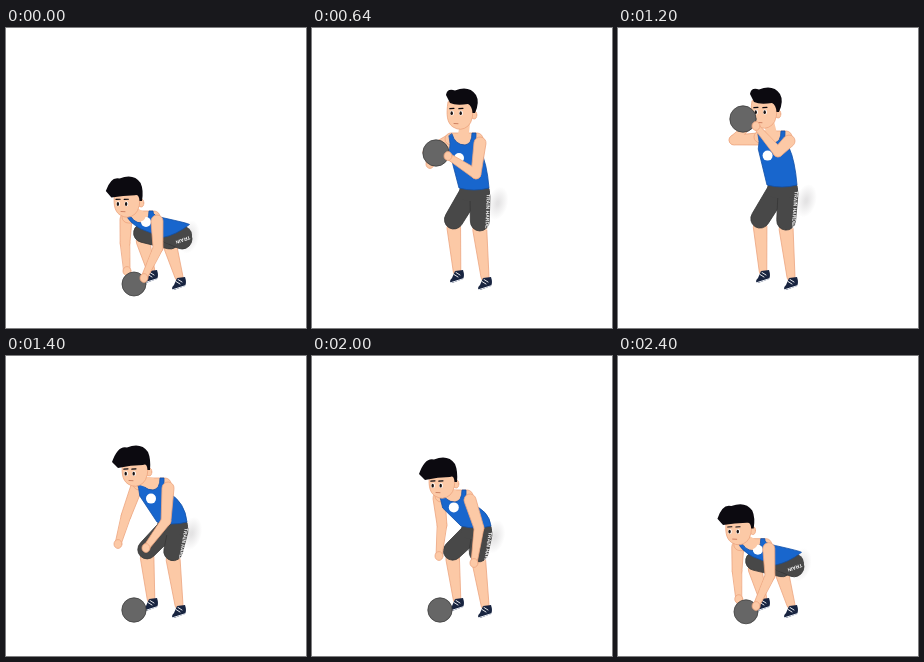
An HTML page with a canvas that plays this animation: 300 by 300 pixels, repeating every 2440 ms.

```html
<!DOCTYPE html>
<html lang="en">
<head>
<meta charset="utf-8">
<title>Ball slam</title>
<style>
html, body { margin: 0; width: 100%; height: 100%; overflow: hidden; background: #fff; }
canvas { display: block; width: 100vw; height: 100vh; }
</style>
</head>
<body>
<canvas id="stage"></canvas>
<script>
const LOOP = 2440, STEP = 40;
const SKIN = '#fcc9a6', EDGE = '#eda57f', BLUE = '#1866cd', SHORTS = '#484848', HAIR = '#0c0a10';
const canvas = document.getElementById('stage');
const ctx = canvas.getContext('2d');

// Each key: time, then the values at that time.
const head = [ // x, y, how far the face looks down
  [0, 122, 175, .8], [320, 131, 131, .3], [640, 149, 87, 0], [900, 151, 86, 0],
  [1200, 147, 86, 0], [1400, 130, 116, 1], [1680, 141, 99, 1], [2000, 131, 128, 1],
  [2240, 119, 167, .9], [LOOP, 122, 175, .8]
];
const body = [ // shoulders x, y, hips x, y, hip angle
  [0, 135, 188, 170, 203, -.45], [320, 140, 149, 165, 182, 0], [640, 152, 110, 162, 160, 0],
  [900, 153, 108, 163, 158, 0], [1200, 155, 108, 164, 157, 0], [1400, 146, 127, 166, 166, 0],
  [1680, 155, 113, 164, 157, 0], [2000, 142, 139, 164, 170, 0], [2240, 133, 181, 169, 199, -.35],
  [LOOP, 135, 188, 170, 203, -.45]
];
const leftArm = [ // elbow x, y, hand x, y
  [0, 119, 215, 121, 243], [320, 126, 177, 127, 194], [640, 116, 124, 118, 136],
  [900, 131, 80, 138, 49], [1120, 124, 92, 128, 62], [1200, 116, 112, 130, 98],
  [1300, 113, 145, 108, 160], [1400, 120, 160, 112, 188], [1680, 137, 145, 134, 176],
  [2000, 130, 169, 127, 200], [2240, 119, 212, 119, 244], [LOOP, 119, 215, 121, 243]
];
const rightArm = [
  [0, 152, 220, 138, 250], [320, 163, 184, 141, 205], [640, 164, 146, 136, 128],
  [900, 177, 82, 161, 51], [1120, 168, 102, 146, 66], [1200, 160, 124, 138, 98],
  [1300, 150, 150, 128, 162], [1400, 160, 165, 140, 192], [1680, 177, 149, 171, 182],
  [2000, 167, 172, 162, 207], [2240, 152, 216, 140, 250], [LOOP, 152, 220, 138, 250]
];
const ball = [ // x, y, radius
  [0, 128, 256, 12], [320, 130, 204, 12.4], [640, 124, 125, 13.2], [900, 149, 40, 13.4],
  [1120, 134, 54, 13.4], [1200, 125, 91, 13.2], [1300, 112, 165, 12.6], [1400, 128, 254, 12.2],
  [2240, 128, 254, 12.2], [LOOP, 128, 256, 12]
];

// Monotone cubic through the keys: smooth, without overshoot.
function sample(keys, t) {
  let i = 0;
  while (i < keys.length - 2 && t >= keys[i + 1][0]) i++;
  const a = keys[i], b = keys[i + 1], dt = b[0] - a[0], u = (t - a[0]) / dt;
  const rate = (n, c) => (keys[n + 1][c] - keys[n][c]) / (keys[n + 1][0] - keys[n][0]);
  const slope = (n, c) => {
    if (n === 0 || n === keys.length - 1) return 0;
    const p = rate(n - 1, c), q = rate(n, c);
    return p * q <= 0 ? 0 : 2 * p * q / (p + q);
  };
  const u2 = u * u, u3 = u2 * u;
  return a.slice(1).map((v, j) => {
    const c = j + 1;
    return v * (2 * u3 - 3 * u2 + 1) + b[c] * (3 * u2 - 2 * u3) +
      dt * (slope(i, c) * (u3 - 2 * u2 + u) + slope(i + 1, c) * (u3 - u2));
  });
}

function paint(fill, stroke, width = .8) {
  if (fill) { ctx.fillStyle = fill; ctx.fill(); }
  if (stroke) { ctx.strokeStyle = stroke; ctx.lineWidth = width; ctx.stroke(); }
}

function oval(x, y, rx, ry, fill, stroke) {
  ctx.beginPath();
  ctx.ellipse(x, y, rx, ry, 0, 0, 2 * Math.PI);
  paint(fill, stroke);
}

function line(x1, y1, x2, y2, color, width) {
  ctx.beginPath();
  ctx.moveTo(x1, y1);
  ctx.lineTo(x2, y2);
  paint(null, color, width);
}

// Tapered capsule between two joints.
function limb(x1, y1, r1, x2, y2, r2, fill, stroke) {
  const a = Math.atan2(y2 - y1, x2 - x1), q = Math.PI / 2;
  ctx.beginPath();
  ctx.arc(x1, y1, r1, a + q, a - q);
  ctx.arc(x2, y2, r2, a - q, a + q);
  ctx.closePath();
  paint(fill, stroke);
}

function arm(x, y, [ex, ey, hx, hy]) {
  limb(ex, ey, 4.8, hx, hy, 3, SKIN, EDGE);
  limb(x, y, 6, ex, ey, 4.9, SKIN, EDGE);
  limb(ex, ey, 4.3, (ex + hx) / 2, (ey + hy) / 2, 3.4, SKIN);
  oval(hx, hy, 4, 4.4, SKIN, EDGE);
}

function shoe(x, y) {
  ctx.beginPath();
  ctx.moveTo(x - 2, y - 5);
  ctx.lineTo(x + 6, y - 6);
  ctx.quadraticCurveTo(x + 8, y, x + 6, y + 3);
  ctx.lineTo(x - 5, y + 7);
  ctx.quadraticCurveTo(x - 9, y + 6, x - 5, y + 2);
  ctx.closePath();
  paint('#182440');
  line(x - 6, y + 6.6, x + 6, y + 2.8, '#e9edf5', 1);
  line(x - 3, y - 1.5, x + 1, y + 1, '#fff', .9);
  line(x - 1, y - 3.5, x + 3, y - 1, '#fff', .9);
}

function thigh(x, y, kx, ky) {
  limb(x, y, 10, kx, ky - 8, 9.4, SHORTS, '#363636');
}

function thighText(x, y, kx, ky) {
  const x1 = x + 8, y1 = y - 2, x2 = kx + 7, y2 = ky;
  const len = Math.hypot(x2 - x1, y2 - y1);
  ctx.save();
  ctx.translate(x1, y1);
  ctx.rotate(Math.atan2(y2 - y1, x2 - x1));
  ctx.beginPath();
  ctx.rect(0, -3, len, 6);
  ctx.clip();
  ctx.font = 'bold 5px Arial, "Liberation Sans", sans-serif';
  ctx.textBaseline = 'middle';
  ctx.fillStyle = '#fff';
  ctx.fillText('TRAIN HARDER', 0, 0);
  ctx.restore();
}

function shadow(hx, hy, lean) {
  ctx.save();
  ctx.translate(hx + 28 - 15 * lean, hy + 19 - 13 * lean);
  ctx.rotate(.25);
  ctx.scale(.6, 1);
  const g = ctx.createRadialGradient(0, 0, 2, 0, 0, 17);
  g.addColorStop(0, 'rgba(90,85,90,.16)');
  g.addColorStop(1, 'rgba(90,85,90,0)');
  oval(0, 0, 17, 17, g);
  ctx.restore();
}

function torso(sx, sy, hx, hy, angle, lean) {
  const l = lean ** 3, c = 15 * Math.cos(angle), s = 15 * Math.sin(angle);
  limb(sx - 13, sy + 1, 6, sx + 13, sy + 1, 6, SKIN, EDGE);
  ctx.beginPath();
  ctx.moveTo(sx - 12, sy - 4);
  ctx.quadraticCurveTo(sx - 9, sy + 7, sx + 1, sy + 7);
  ctx.quadraticCurveTo(sx + 8, sy + 6, sx + 8, sy - 5);
  ctx.lineTo(sx + 12, sy - 5);
  ctx.quadraticCurveTo(sx + 11, sy + 6 - 6 * l, sx + 16 + 7 * l, sy + 12 - 10 * l);
  ctx.quadraticCurveTo(hx + 13, (sy + hy) / 2, hx + c, hy + s);
  ctx.quadraticCurveTo(hx, hy + 4, hx - c, hy - s);
  ctx.lineTo(sx - 15 + 15 * l, sy + 13);
  ctx.quadraticCurveTo(sx - 13, sy + 6, sx - 15, sy - 2);
  ctx.closePath();
  paint(BLUE, '#1150a8');
  oval(sx + (hx - sx) * .4 - 9, sy + (hy - sy) * .4, 5, 5, '#fff');
}

function face(x, y, k) {
  ctx.save();
  ctx.translate(x, y);
  oval(13, 0, 2.8, 4, SKIN, EDGE);
  ctx.beginPath();
  ctx.moveTo(-13, -13);
  ctx.bezierCurveTo(-15, 0, -14, 8, -8, 12);
  ctx.quadraticCurveTo(0, 17, 7, 11);
  ctx.quadraticCurveTo(13, 6, 12, -12);
  ctx.closePath();
  paint(SKIN, EDGE);
  const ey = -2 + 3.5 * k;
  for (const ex of [-9 - k, 0 - 2 * k]) {
    oval(ex, ey, 1.9, 2.5, '#fff');
    oval(ex - .3, ey + .2, 1.2, 1.9, '#1a1210');
    line(ex - 2.2, ey - 4.4, ex + 2, ey - 4.6, HAIR, 1.1);
  }
  line(-7, 8.5, -3, 8.7, '#c97a5c', .9);
  ctx.beginPath();
  ctx.moveTo(-15 - 9 * k, -20 + 10 * k);
  ctx.quadraticCurveTo(-14 - 4 * k, -27, -6 - 3 * k, -24.5);
  ctx.quadraticCurveTo(8 - 3 * k, -30, 15 - 3 * k, -20);
  ctx.quadraticCurveTo(19 - 4 * k, -13, 14, -2);
  ctx.lineTo(11.5, -2);
  ctx.quadraticCurveTo(11, -9, 7, -11 + 4 * k);
  ctx.quadraticCurveTo(-5, -9 + 2 * k, -11 - 7 * k, -12 + 8 * k);
  ctx.closePath();
  paint(HAIR);
  ctx.restore();
}

function draw(t) {
  const size = devicePixelRatio || 1;
  const w = Math.round(innerWidth * size), h = Math.round(innerHeight * size);
  if (canvas.width !== w || canvas.height !== h) { canvas.width = w; canvas.height = h; }
  ctx.setTransform(w / 300, 0, 0, h / 300, 0, 0);
  ctx.fillStyle = '#fff';
  ctx.fillRect(0, 0, 300, 300);
  ctx.lineJoin = ctx.lineCap = 'round';

  const [x, y, down] = sample(head, t);
  const [sx, sy, hx, hy, angle] = sample(body, t);
  const [bx, by, br] = sample(ball, t);
  const lean = Math.max(0, Math.min(1, (hx - sx) / 35));
  const low = (hy - 158) / 45;
  const kl = [142 - 5 * low, 199 + 14 * low], kr = [168 - 5 * low, 201 + 13 * low];

  shadow(hx, hy, lean);
  limb(kl[0], kl[1], 6.8, 145, 243, 3.8, SKIN, EDGE);
  limb(kr[0], kr[1], 7, 173, 249, 4, SKIN, EDGE);
  shoe(145, 248);
  shoe(173, 255);
  thigh(hx - 6, hy + 8, ...kl);
  thigh(hx + 6, hy + 8, ...kr);
  limb(hx - 6, hy + 4, 9, hx + 7, hy + 4, 9, SHORTS);
  thighText(hx + 6, hy + 8, ...kr);
  arm(sx - 15, sy + 3, sample(leftArm, t));
  torso(sx, sy, hx, hy, angle, lean);
  limb(x + 4, y + 8, 5, sx - 1, sy, 5.5, SKIN);
  face(x, y, down);
  oval(bx, by, br, br, '#666', '#3f3f3f');
  arm(sx + 16, sy + 5, sample(rightArm, t));
}

const start = performance.now();
function tick() {
  const t = (performance.now() - start) % LOOP;
  draw(Math.floor(t / STEP) * STEP);
  requestAnimationFrame(tick);
}
tick();
</script>
</body>
</html>
```
